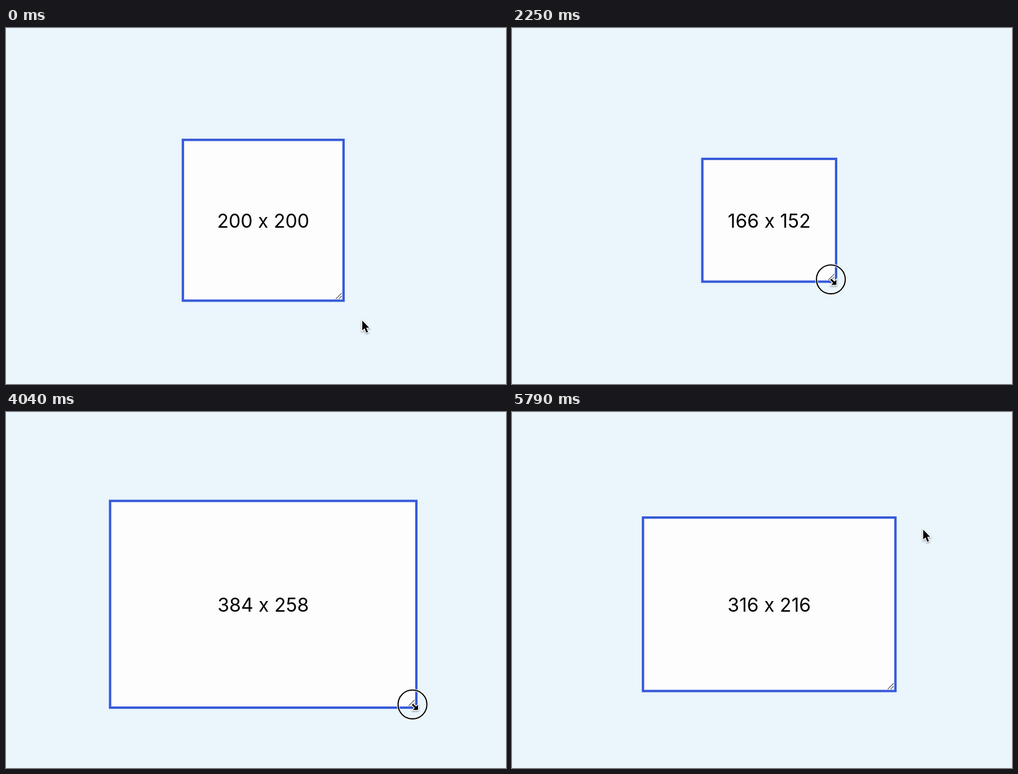
Write an HTML page with a canvas that moves like this. It is 887 px wide and 631 px high and loops after 5870 ms.

```html
<!DOCTYPE html>
<html lang="en">
<head>
<meta charset="utf-8">
<title>Resizable box</title>
<style>
  html, body { margin: 0; width: 100%; height: 100%; overflow: hidden; background: #eaf5fc; }
  canvas { position: absolute; left: 0; top: 0; }
  #label {
    position: absolute; left: 306.3px; top: 322px; width: 300px;
    font: 33.7px/40px Inter, "Liberation Sans", sans-serif;
    font-variant-ligatures: no-contextual;
    text-align: center; white-space: nowrap; color: #000;
  }
</style>
</head>
<body>
<canvas id="stage" width="887" height="631"></canvas>
<div id="label">200 x 200</div>
<script>
const ctx = document.getElementById('stage').getContext('2d');
const label = document.getElementById('label');

const LOOP = 5870, STEP = 1000 / 24, LAST_STEP = 139;
const CENTER = { x: 456.3, y: 340.8 };
const SCALE = 1.404, BORDER = 4.2, START_SIZE = 200;
const GRIP = { x: -10.5, y: -7.8 };
const LEAD = 15, PRESS = 860, RELEASE = 5190;

const clamp = u => Math.min(1, Math.max(0, u));
const smooth = u => u * u * (3 - 2 * u);
const easeOut = u => 1 - (1 - u) ** 2.8;
const mix = (a, b, u) => a + (b - a) * u;
const mixPoint = (a, b, u) => ({ x: mix(a.x, b.x, u), y: mix(a.y, b.y, u) });

// Each drag eases the size towards its next turning point
const drag = (from, to, size, ease = smooth) => (value, t) =>
  mix(value, size, ease(clamp((t - from) / (to - from))));

const widthDrags = [
  drag(900, 1560, 236),
  drag(1600, 2460, 154),
  drag(2460, 4515, 420),
  drag(4515, 5080, 316),
];
const heightDrags = [
  drag(895, 1830, 70),
  drag(1830, 4100, 258, easeOut),
  drag(4150, 4560, 245),
  drag(4800, 5090, 216),
];
const sizeAt = (drags, t) => drags.reduce((value, move) => move(value, t), START_SIZE);

function makeBox(w, h) {
  const halfW = w * SCALE / 2 + BORDER, halfH = h * SCALE / 2 + BORDER;
  return { w, h, halfW, halfH, right: CENTER.x + halfW, bottom: CENTER.y + halfH };
}

// The pointer runs slightly ahead of the box it drags
function pointerAt(t) {
  const box = makeBox(sizeAt(widthDrags, t + LEAD), sizeAt(heightDrags, t + LEAD));
  const grip = { x: box.right + GRIP.x, y: box.bottom + GRIP.y };
  if (t < PRESS) return mixPoint({ x: 632, y: 518.5 }, grip, smooth(clamp((t - 250) / 583)));
  return mixPoint(grip, { x: 729.5, y: 208.5 }, smooth(clamp((t - 5542) / 250)));
}

function trace(points) {
  ctx.beginPath();
  points.forEach(([x, y]) => ctx.lineTo(x, y));
}

function drawBox(box) {
  ctx.fillStyle = '#365ad8';
  ctx.fillRect(CENTER.x - box.halfW, CENTER.y - box.halfH, box.halfW * 2, box.halfH * 2);
  ctx.fillStyle = '#fdfdfd';
  ctx.fillRect(CENTER.x - box.halfW + BORDER, CENTER.y - box.halfH + BORDER,
    (box.halfW - BORDER) * 2, (box.halfH - BORDER) * 2);
  ctx.strokeStyle = '#505050';
  ctx.lineWidth = 1.2;
  for (const length of [10.4, 5.2]) {
    trace([[box.right - 5.4 - length, box.bottom - 5.2], [box.right - 5.4, box.bottom - 5.2 - length]]);
    ctx.stroke();
  }
}

const ARROW = [[0, 0], [0, 17.5], [4, 13.8], [7.2, 21.5], [10.2, 20.2], [7, 12.7], [12.2, 12.7]];
const RESIZE = [[1, -1.2], [6.2, 4], [9.8, 0.8], [9.8, 9.8], [0.8, 9.8], [4, 6.2], [-1.2, 1]];

function drawCursor(points, pos) {
  ctx.save();
  ctx.translate(pos.x, pos.y);
  trace(points);
  ctx.closePath();
  ctx.shadowColor = 'rgba(0,0,0,.4)';
  ctx.shadowBlur = 3;
  ctx.shadowOffsetY = 1.5;
  ctx.strokeStyle = '#fff';
  ctx.lineWidth = 2.8;
  ctx.stroke();
  ctx.shadowColor = 'transparent';
  ctx.fillStyle = '#000';
  ctx.fill();
  ctx.restore();
}

function drawPress(pos) {
  ctx.beginPath();
  ctx.arc(pos.x, pos.y, 25.6, 0, Math.PI * 2);
  ctx.strokeStyle = 'rgba(255,255,255,.85)';
  ctx.lineWidth = 4.6;
  ctx.stroke();
  ctx.strokeStyle = '#000';
  ctx.lineWidth = 2.1;
  ctx.stroke();
}

function render(now) {
  const step = Math.min(LAST_STEP, Math.floor((now % LOOP + 4.9) / STEP));
  const t = step * STEP;
  const box = makeBox(Math.round(sizeAt(widthDrags, t)), Math.round(sizeAt(heightDrags, t)));
  const pointer = pointerAt(t);
  const pressed = t >= PRESS && t < RELEASE;
  const within = gap => gap > 4 && gap < 22;
  const onGrip = within(box.right - pointer.x) && within(box.bottom - pointer.y);

  ctx.fillStyle = '#eaf5fc';
  ctx.fillRect(0, 0, 887, 631);
  drawBox(box);
  if (pressed) drawPress(pointer);
  drawCursor(pressed || onGrip ? RESIZE : ARROW, pointer);
  label.textContent = `${box.w} x ${box.h}`;
}

const start = performance.now();
function tick() {
  render(performance.now() - start);
  requestAnimationFrame(tick);
}
tick();
</script>
</body>
</html>
```
